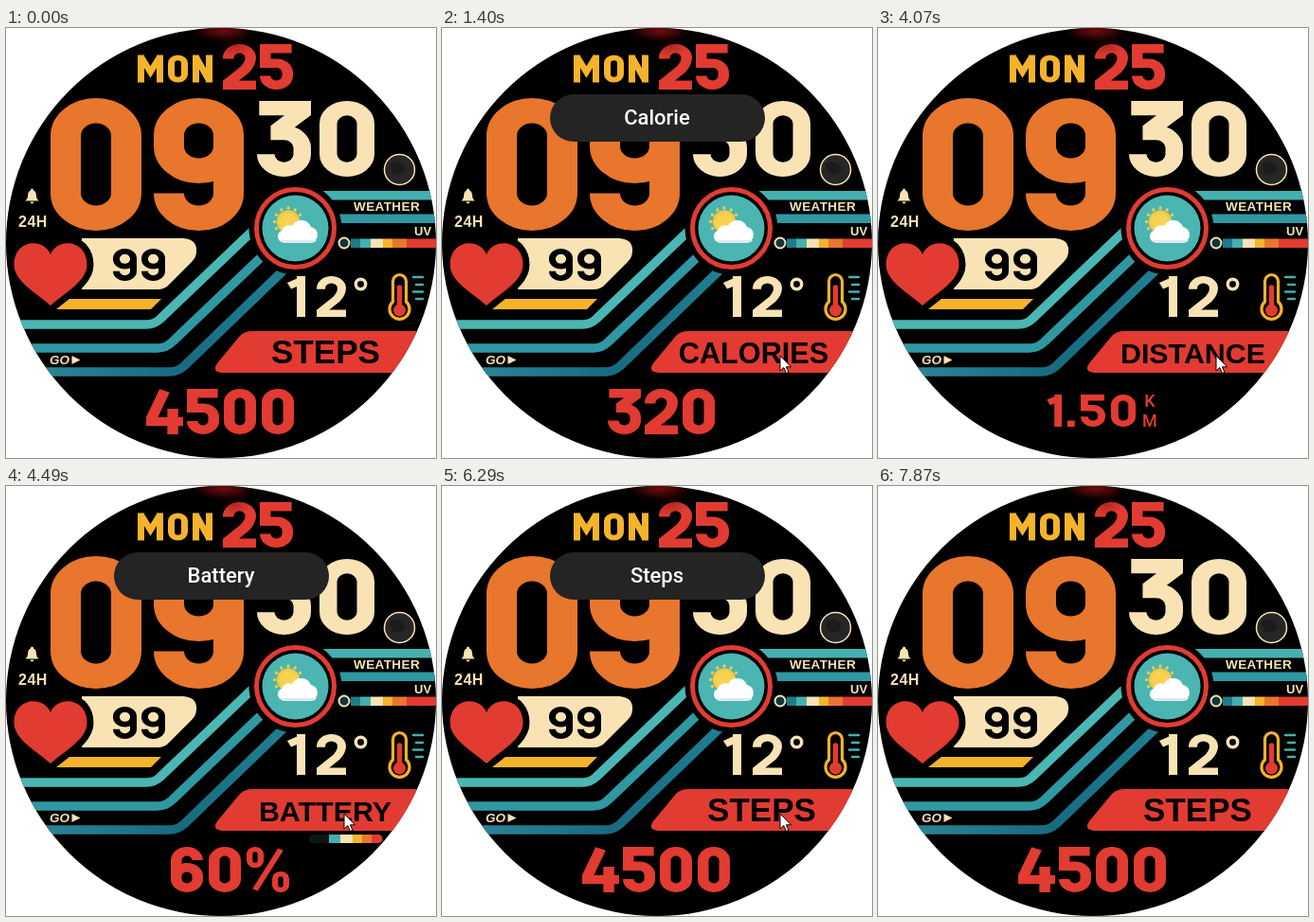
These frames come from a looping animation (454x454 px, 8000 ms). An HTML page:

```html
<!DOCTYPE html>
<html lang="en">
<head>
<meta charset="utf-8">
<title>Watch face</title>
<style>
html, body { margin: 0; width: 100%; height: 100%; overflow: hidden; background: #fff; }
svg { display: block; width: 100vw; height: 100vh; }
text { font-family: "Liberation Sans", Arial, sans-serif; font-weight: 700; }
.toast text { font-family: Roboto, sans-serif; font-weight: 500; }
.glyphs path { fill: none; stroke-miterlimit: 6; }
</style>
</head>
<body>
<svg viewBox="0 0 454 454">
  <defs>
    <clipPath id="dial"><circle cx="227" cy="227" r="227"/></clipPath>
    <radialGradient id="glow">
      <stop offset="0" stop-color="#700c0c"/>
      <stop offset=".5" stop-color="#480808" stop-opacity=".8"/>
      <stop offset="1" stop-color="#200" stop-opacity="0"/>
    </radialGradient>
    <radialGradient id="shade">
      <stop offset="0" stop-color="#400" stop-opacity=".35"/>
      <stop offset="1" stop-color="#400" stop-opacity="0"/>
    </radialGradient>
    <linearGradient id="deep" gradientUnits="userSpaceOnUse" x1="45" y1="0" x2="295" y2="0">
      <stop offset="0" stop-color="#2a8494"/>
      <stop offset=".55" stop-color="#176a80"/>
      <stop offset="1" stop-color="#1f7f92"/>
    </linearGradient>
  </defs>
  <g clip-path="url(#dial)">
    <rect width="454" height="454" fill="#000"/>
    <ellipse cx="230" cy="3" rx="36" ry="12" fill="url(#glow)"/>

    <g fill="none" stroke-width="9.500">
      <path stroke="#4bb7b5" d="M0 313H148Q157 313 163 307L270 205"/>
      <path stroke="#2f98a3" d="M0 338H160Q169 338 176 331L285 227"/>
      <path stroke="url(#deep)" d="M0 363H172Q181 363 188 357L300 249"/>
    </g>
    <path fill="#44b0b0" d="M335 172H454V181.500H335z"/>
    <path fill="#2f98a3" d="M340 196.500H454V206H340z"/>

    <path fill="#f9e3b5" d="M80 222H187Q202 223 201 236Q201 242 196 247L173 270Q168 276 160 276H80z"/>
    <path fill="#f5b32b" d="M62 286H164L153 297H52z"/>
    <path fill="#e23b32" stroke="#000" stroke-width="14" paint-order="stroke" stroke-linejoin="round"
      d="M47 239C40 221 8.500 223 8.500 250C8.500 267 31 279 47 293C63 279 85.500 267 85.500 250C85.500 223 54 221 47 239z"/>

    <circle cx="305.500" cy="211.500" r="49" fill="#000"/>
    <circle cx="305.500" cy="211.500" r="41" fill="none" stroke="#e23b32" stroke-width="5"/>
    <circle cx="305.500" cy="211.500" r="35" fill="#4bb5b2"/>
    <g id="sun" fill="#f9d251" stroke="#f7cb45" stroke-width="3" stroke-linecap="round">
      <circle cx="298" cy="204.500" r="10.500"/>
    </g>
    <path fill="#fff" d="M291 226A6.500 6.500 0 0 1 291 214A8 8 0 0 1 302 209A11 11 0 0 1 322 210A8.500 8.500 0 0 1 324 226z"/>
    <path fill="#dfe8ee" d="M289 224H328Q326 227 322 227H292z"/>

    <circle cx="415.500" cy="149.500" r="16" fill="#262626" stroke="#f9e3b5" stroke-width="1.500"/>
    <path fill="#1c1c1c" d="M406 143Q414 138 420 145T412 155Q404 151 406 143z"/>

    <g fill="#f9e3b5">
      <path d="M27.500 169.500Q29 169.500 29 171.500Q32 172.500 32 177.500Q32 180.500 34.500 182.500H20.500Q23 180.500 23 177.500Q23 172.500 26 171.500Q26 169.500 27.500 169.500zM25.500 183.500H29.500Q29 185.500 27.500 185.500T25.500 183.500z"/>
      <text x="13" y="209.500" font-size="16" letter-spacing=".5">24H</text>
      <text x="46" y="355" font-size="13.500" font-style="italic">GO</text>
      <path d="M69.500 346L78.500 350.500L69.500 355z"/>
      <text x="367" y="193" font-size="13.500" letter-spacing=".4">WEATHER</text>
      <text x="431" y="219" font-size="13">UV</text>
    </g>
    <circle cx="357" cy="227" r="5.500" fill="#12363c" stroke="#f9e3b5" stroke-width="2"/>
    <g id="uv"></g>

    <g fill="none" stroke-linecap="round">
      <path stroke="#f5b32b" stroke-width="3.200" d="M408.500 289V267.500A7 7 0 0 1 422.500 267.500V289A10.500 10.500 0 1 1 408.500 289z"/>
      <path stroke="#e23b32" stroke-width="5.500" d="M415.500 274V293"/>
      <circle cx="415.500" cy="298" r="6.500" fill="#e23b32"/>
      <path stroke="#44b0b0" stroke-width="2.400" d="M430 263H440M433 271H440M430 278.500H440M433 286H440"/>
    </g>
    <path fill="#e23b32" d="M260 320H454V364H228Q217 363 223 354L247 325Q252 320 260 320z"/>
    <g id="face"></g>
    <ellipse cx="241" cy="17" rx="20" ry="15" fill="url(#shade)"/>
    <g id="charge"></g>
    <g id="readouts"></g>
    <text id="unit" fill="#e23b32" text-anchor="middle" font-size="18" style="font-family:Roboto,sans-serif;font-weight:500">
      <tspan x="287" y="400">K</tspan><tspan x="287" y="421">M</tspan>
    </text>
    <text id="label" y="354" text-anchor="middle"></text>
  </g>
  <g id="toast" class="toast">
    <rect x="114" y="70" width="227" height="50" rx="25" fill="#242424"/>
    <text id="note" x="227" y="102" font-size="22" fill="#fff" text-anchor="middle"></text>
  </g>
  <circle id="click" cx="356" cy="346" r="12" fill="#ff0" fill-opacity=".47"/>
  <path id="cursor" fill="#fff" stroke="#000" d="M0 0V16L3.700 12.500L6.500 18.500L9 17.500L6.400 11.800H11.500z"/>
</svg>
<script>
const NS = "http://www.w3.org/2000/svg";
const $ = id => document.getElementById(id);
const CREAM = "#f9e3b5", RED = "#e23b32", ORANGE = "#e8762c", YELLOW = "#f5b32b", TEAL = "#44b0b0";
const CONTRAST = .83; // horizontal strokes are thinner than vertical ones

function add(parent, tag, attrs) {
  const el = document.createElementNS(NS, tag);
  for (const k in attrs) el.setAttribute(k, attrs[k]);
  return parent.appendChild(el);
}

// Centre line of a glyph in the box x, y, w, h for pen width s.
function outline(ch, x, y, w, h, s) {
  const L = x + s / 2, R = x + w - s / 2, T = y + s / 2, B = y + h - s / 2;
  const X = x + w, Y = y + h, C = x + w / 2, r = (R - L) / 2;
  const arc = (px, py, ry = r) => `A${r} ${ry} 0 0 1 ${px} ${py}`;
  const loop = (t, b) => {
    const ry = Math.min(r, (b - t) / 2);
    return `M${L} ${t + ry}${arc(R, t + ry, ry)}V${b - ry}${arc(L, b - ry, ry)}Z`;
  };
  const hook = `V${B - r}${arc(L, B - r)}`;
  const b = T + .4 * (B - T);
  const bowl = `H${C}${arc(R, b + r)}${hook}`;
  switch (ch) {
    case "0": case "O": return loop(T, B);
    case "1": return `M${R} ${Y}V${y}M${x} ${T + .75 * (w - s) + .2 * s}L${R} ${T + .15 * s}`;
    case "2": return `M${L} ${T + 1.1 * r}V${T + r}${arc(R, T + r)}` +
      `Q${R} ${T + 1.6 * r} ${C + .5 * r} ${T + 2.25 * r}L${L} ${B - .25 * s}V${B}H${X}`;
    case "3": return `M${x + .04 * w} ${T}H${R}V${T + .25 * s}L${C - .25 * r} ${b - .25 * s}V${b}${bowl}`;
    case "4": {
      const bar = y + .72 * h, stem = x + .72 * w;
      return `M${x + .5 * w} ${y + .2 * s}L${L} ${bar - .4 * s}V${bar}H${X}M${stem} ${y + .44 * h}V${Y}`;
    }
    case "5": return `M${X - .04 * w} ${T}H${L}V${b}${bowl}`;
    case "6": case "9": return loop(T, T + .56 * (B - T)) + `M${R} ${T + r}${hook}`;
    case ".": return `M${x} ${B}h${s}`;
    case "M": return `M${L} ${Y}V${y}M${R} ${Y}V${y}M${L} ${y + .3 * s}L${C} ${y + .62 * h}L${R} ${y + .3 * s}`;
    case "N": return `M${L} ${Y}V${y}M${R} ${Y}V${y}M${L} ${y + .35 * s}L${R} ${Y - .35 * s}`;
  }
}

// parts: [character, x, width] for each glyph
function word(parent, parts, y, height, s, color) {
  const h = height / CONTRAST;
  const g = add(parent, "g", {
    class: "glyphs", role: "img", "aria-label": parts.map(p => p[0]).join(""),
    transform: `translate(0 ${y}) scale(1 ${CONTRAST})`
  });
  for (const [ch, x, w] of parts) {
    const pen = { stroke: color, "stroke-width": s };
    if (ch === "%") {
      const thin = .55 * s, cw = .4 * w, chh = .46 * h;
      pen["stroke-width"] = thin;
      pen.d = outline("0", x, 0, cw, chh, thin) +
        outline("0", x + w - cw, h - chh, cw, chh, thin) +
        `M${x + .2 * w} ${h - thin / 2}L${x + .8 * w} ${thin / 2}`;
    } else {
      pen.d = outline(ch, x, 0, w, h, s);
      if (ch === "6") pen.transform = `rotate(180 ${x + w / 2} ${h / 2})`;
    }
    add(g, "path", pen);
  }
  return g;
}

function strip(parent, y, h, stops) {
  stops.forEach(([x, fill], i) => {
    if (stops[i + 1]) add(parent, "rect", { x, y, width: stops[i + 1][0] - x, height: h, fill });
  });
}

const face = $("face");
word(face, [["M", 139, 27], ["O", 171, 21], ["N", 197, 21]], 28.5, 29, 7, YELLOW);
word(face, [["2", 229, 35], ["5", 268, 35]], 17, 48, 11.5, RED);
word(face, [["0", 47, 96], ["9", 156, 95]], 74, 140, 32, ORANGE);
word(face, [["3", 265, 57], ["0", 331, 58]], 77, 80, 18.5, CREAM);
word(face, [["9", 113, 25], ["9", 143, 25]], 233, 34, 7, "#000");
word(face, [["1", 299, 17], ["2", 328, 31]], 262, 43, 9, CREAM);
add(face, "circle", { cx: 374.5, cy: 270.5, r: 5.2, fill: "none", stroke: CREAM, "stroke-width": 3.5 });

for (let i = 0; i < 12; i++) {
  add($("sun"), "path", { d: "M298 190.500V189.800", transform: `rotate(${i * 30} 298 204.500)` });
}
strip($("uv"), 222.5, 9.5, [[364, "#1d7c8b"], [374, TEAL], [385, CREAM],
  [398, YELLOW], [408, ORANGE], [423, RED], [454]]);
strip($("charge"), 368, 9, [[324, "#0b1618"], [341, TEAL], [353, CREAM],
  [366, YELLOW], [376, ORANGE], [386, RED], [393]]);
add($("charge"), "path", { d: "M393 368A4.500 4.500 0 0 1 393 377z", fill: RED });
add($("charge"), "path", { d: "M324 368A4.500 4.500 0 0 0 324 377z", fill: "#0b1618" });

const modes = {
  Steps: { size: 35, x: 337.5, label: "STEPS", parts: [["4", 148, 39], ["5", 191, 34], ["0", 230, 34], ["0", 270, 34]] },
  Calorie: { size: 30.7, x: 329, label: "CALORIES", parts: [["3", 175, 35], ["2", 214, 35], ["0", 254, 34]] },
  Distance: { size: 30.4, x: 332.5, label: "DISTANCE", parts: [["1", 180, 14], [".", 200, 8], ["5", 214, 26], ["0", 246, 26]], y: 387, h: 34, s: 7.8 },
  Battery: { size: 30.4, x: 337, label: "BATTERY", parts: [["6", 174, 34], ["0", 214, 34], ["%", 254, 45]] }
};
for (const m of Object.values(modes)) {
  m.el = word($("readouts"), m.parts, m.y || 381, m.h || 48, m.s || 11.5, RED);
}

const LOOP = 8000;
// [time, value] steps; the latest one reached holds
const modeSteps = [[0, "Steps"], [1340, "Calorie"], [2900, "Distance"], [4430, "Battery"], [6230, "Steps"]];
const toastSteps = [[0, ""], [1400, "Calorie"], [2960, "Distance"], [4070, ""], [4490, "Battery"],
  [5690, ""], [6290, "Steps"], [7150, ""]];
const cursorSteps = [[0, null], [480, [399, 350]], [540, [381, 349]], [600, [364, 347]],
  [660, [357, 346]], [7810, [357, 354]], [7870, null]];
const clicks = [[1200, 1340], [2780, 2900], [4310, 4430], [6110, 6230]];

const at = (steps, t) => steps.filter(s => s[0] <= t).pop()[1];
const show = (el, on) => el.setAttribute("visibility", on ? "visible" : "hidden");

function draw(t) {
  const name = at(modeSteps, t), mode = modes[name];
  for (const k in modes) show(modes[k].el, k === name);
  show($("unit"), name === "Distance");
  show($("charge"), name === "Battery");
  const label = $("label");
  label.textContent = mode.label;
  label.setAttribute("x", mode.x);
  label.setAttribute("font-size", mode.size);

  const note = at(toastSteps, t);
  show($("toast"), note);
  $("note").textContent = note;

  const pos = at(cursorSteps, t);
  show($("cursor"), pos);
  if (pos) $("cursor").setAttribute("transform", `translate(${pos})`);
  show($("click"), clicks.some(([a, b]) => t >= a && t < b));
}

const start = performance.now();
function tick() {
  draw((performance.now() - start) % LOOP);
  requestAnimationFrame(tick);
}
tick();
</script>
</body>
</html>
```
